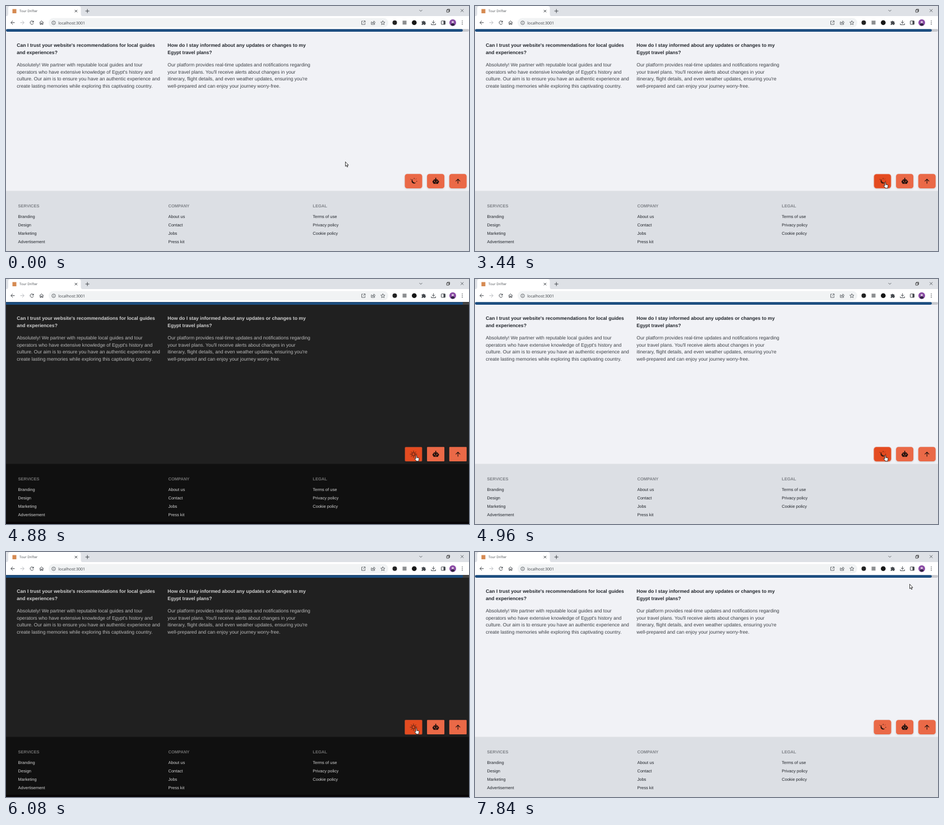
These frames come from a looping animation (826x438 px, 8000 ms). An HTML page:

```html
<!DOCTYPE html>
<html lang="en">
<head>
<meta charset="utf-8">
<title>Tour Drifter</title>
<style>
html, body { margin: 0; width: 100%; height: 100%; overflow: hidden; background: #fff; }
svg {
  display: block; width: 826px; height: 438px;
  animation: theme 8s step-end infinite;
}
text { text-rendering: geometricPrecision; white-space: pre; }

/* browser frame */
.ui { font-family: "Open Sans", "Noto Sans", sans-serif; }
.line { fill: none; stroke: #45494e; stroke-width: 1; }
.thin { stroke-width: .8; }
.dim { stroke: #b9bcc0; }
.solid { fill: #45494e; }

/* page */
.page { font-family: "Liberation Sans", Arial, sans-serif; fill: var(--ink); }
.bg { fill: var(--bg); }
.foot { fill: var(--foot); }
.edge { fill: var(--edge); }
.track { fill: var(--ink); opacity: .2; rx: var(--bar); }
.bar { fill: #1c4e80; rx: var(--bar); }
.head { font-size: 8.61px; font-weight: 700; }
.body { font-size: 8.61px; opacity: .88; }
.title { font-size: 7.53px; font-weight: 700; opacity: .5; }
.link { font-size: 7.53px; }

/* buttons */
.btn { fill: #ea6947; rx: var(--btn); filter: drop-shadow(0 1.5px 1.5px rgba(0, 0, 0, .16)); }
.hot { fill: #e44b20; rx: var(--btn); opacity: 0; }
.ico { fill: #1c100d; }
.ray { fill: none; stroke: #1c100d; stroke-width: .9; stroke-linecap: round; }
.moon { opacity: calc(1 - var(--sun)); }
.sun { opacity: var(--sun); }
#toggle { transform-origin: 727px 313.2px; animation: pop 8s step-end infinite; }
#toggle .hot { animation: hotToggle 8s step-end infinite; }
#bot .hot { animation: hotBot 8s step-end infinite; }

/* pointer */
#pointer { animation: move 8s infinite, shape 8s step-end infinite; }
.arrow { opacity: calc(1 - var(--hand)); }
.hand { opacity: var(--hand); }

/* one percent is 80 ms */
@keyframes theme {
  0%, 62%, 84%, to {
    --bg: #f1f2f6; --foot: #dcdfe4; --edge: #dcdfe4; --ink: #23272d;
    --bar: 2.4px; --btn: 4.3px; --sun: 0;
  }
  44%, 76% {
    --bg: #202020; --foot: #101010; --edge: #080607; --ink: #d0d0d0;
    --bar: .6px; --btn: 1.1px; --sun: 1;
  }
}
@keyframes pop {
  0%, 46%, 65%, 78%, 87%, to { transform: scale(1); }
  41%, 59% { transform: scale(.99); }
  42%, 60%, 62%, 76%, 84% { transform: scale(.98); }
  43%, 61%, 75%, 82% { transform: scale(.965); }
  44% { transform: scale(1.005); }
  45%, 64%, 77%, 86% { transform: scale(1.01); }
  63%, 85% { transform: scale(1.02); }
}
@keyframes hotBot {
  0%, 36%, to { opacity: 0; }
  13% { opacity: .3; }
  14% { opacity: .8; }
  15% { opacity: 1; }
  35% { opacity: .45; }
}
@keyframes hotToggle {
  0%, 88%, to { opacity: 0; }
  36% { opacity: .2; }
  37% { opacity: .7; }
  38% { opacity: 1; }
  87% { opacity: .4; }
}
@keyframes move {
  0% { transform: translate(605px, 278px); animation-timing-function: step-end; }
  3% { transform: translate(605px, 278px); animation-timing-function: steps(3, start); }
  6% { transform: translate(645px, 281px); animation-timing-function: steps(4, start); }
  10% { transform: translate(764px, 288px); animation-timing-function: steps(4, start); }
  14% { transform: translate(778px, 315px); animation-timing-function: step-end; }
  30% { transform: translate(778px, 315px); animation-timing-function: steps(8, start); }
  38% { transform: translate(732px, 315px); animation-timing-function: step-end; }
  86% { transform: translate(732px, 315px); animation-timing-function: steps(3, start); }
  89% { transform: translate(754px, 205px); animation-timing-function: steps(4, start); }
  93% { transform: translate(778px, 64px); animation-timing-function: step-end; }
  98%, to { transform: translate(775px, 57px); animation-timing-function: step-end; }
}
@keyframes shape {
  0%, 34%, 86%, to { --hand: 0; }
  12%, 36% { --hand: 1; }
}
</style>
</head>
<body>
<svg viewBox="0 0 826 438" xmlns="http://www.w3.org/2000/svg">
  <!-- tab strip -->
  <rect width="826" height="19" fill="#dee1e6"/>
  <path d="M0 19Q4 18 4 14V4Q4 0 8 0H129.500Q133.500 0 133.500 4V14Q133.500 18 137.500 19Z" fill="#fff"/>
  <rect x="11.500" y="5.500" width="7" height="7.500" fill="#d58a52"/>
  <text class="ui" x="24" y="11.300" font-size="6" fill="#4a4e53">Tour Drifter</text>
  <path class="line" d="M122.700 6.900l4.400 4.400m0-4.400l-4.400 4.400M141.700 9h7M145.200 5.500v7"/>
  <path class="line thin" d="M737.500 7l2.500 2.500 2.500-2.500M811.200 5.700l5 5m0-5l-5 5"/>
  <path class="line thin" d="M786.200 7h4v4h-4zM787.500 7V5.800h4v4h-1.300" style="stroke:#222"/>

  <!-- toolbar -->
  <rect y="18" width="826" height="23.500" fill="#fff"/>
  <rect x="76" y="21.500" width="606" height="17" rx="8.500" fill="#f1f3f4"/>
  <path class="line" d="M15.500 29.700H8.800m3.200-3.300l-3.300 3.300 3.300 3.300"/>
  <path class="line dim" d="M25.500 29.700h6.700m-3.200-3.300l3.300 3.300-3.300 3.300"/>
  <path class="line" d="M48.700 27.900A3.100 3.100 0 1 0 49.100 30.800"/>
  <path class="solid" d="M49.500 26v3.200h-3.200z"/>
  <path class="line" d="M59.900 29.700l3.500-3.200 3.500 3.200M60.900 29v4h1.700v-2.300h1.600V33h1.700v-4"/>
  <circle class="line thin" cx="85" cy="30" r="3.200"/>
  <path class="line thin" d="M85 29.500v2.100M85 28v.8"/>
  <text class="ui" x="93.300" y="32.600" font-size="7.100" fill="#3b3f44">localhost:3001</text>
  <path class="line thin" d="M637 27h-2.500v6h6v-2.500M638 26.700h2.800v2.800M640.500 27l-3.500 3.500"/>
  <path class="line thin" d="M653 28.500h-1.300V33h6v-1.500M653.300 31q.4-2.500 3-2.500v-1.700l2.500 2.600-2.500 2.300v-1.600q-2 0-3 .9z"/>
  <path class="line thin" d="M672.300 26.300l1 2.500 2.700.2-2 1.800.6 2.600-2.300-1.400-2.300 1.400.6-2.600-2-1.800 2.700-.2z"/>
  <circle cx="693.500" cy="29.800" r="4" fill="#222"/>
  <rect x="707.500" y="26.200" width="7" height="7" fill="#8d8f91"/>
  <circle cx="728.300" cy="29.800" r="4.300" fill="#161616"/>
  <path class="solid" d="M741.600 27.500h2a1.300 1.300 0 0 1 2.500 0h2v2.200a1.300 1.300 0 0 1 0 2.500v1.500h-2.200a1.200 1.200 0 0 0-2.300 0h-2v-2a1.200 1.200 0 0 0 0-2.300z"/>
  <path class="line" d="M762.600 25.700v5m-2.700-2.300l2.700 2.600 2.700-2.600M758.800 31.300v2.200h7.600v-2.200"/>
  <rect class="line" x="776.500" y="26.700" width="7" height="6.200" rx=".6"/>
  <rect class="solid" x="780.500" y="26.700" width="3" height="6.200"/>
  <circle cx="797" cy="29.800" r="6" fill="#8a4ba5"/>
  <path d="M793.700 34.300q0-3.300 3.300-3.300t3.300 3.300q-3.300 2.200-6.600 0z" fill="#2f2440"/>
  <circle cx="797" cy="28.700" r="2" fill="#d9c6dc"/>
  <g class="solid">
    <circle cx="814" cy="26.800" r=".8"/><circle cx="814" cy="29.700" r=".8"/><circle cx="814" cy="32.600" r=".8"/>
  </g>

  <!-- page -->
  <g class="page">
    <rect class="bg" y="41" width="826" height="290"/>
    <rect class="track" y="41.200" width="826" height="4.700"/>
    <rect class="bar" y="41.200" width="815" height="4.700"/>
    <g class="head">
      <text x="19.300" y="73.200">Can I trust your website's recommendations for local guides</text>
      <text x="19.300" y="86.100">and experiences?</text>
      <text x="288.300" y="73.200">How do I stay informed about any updates or changes to my</text>
      <text x="288.300" y="86.100">Egypt travel plans?</text>
    </g>
    <g class="body">
      <text x="19.300" y="107.600">Absolutely! We partner with reputable local guides and tour</text>
      <text x="19.300" y="120.500">operators who have extensive knowledge of Egypt's history and</text>
      <text x="19.300" y="133.400">culture. Our aim is to ensure you have an authentic experience and</text>
      <text x="19.300" y="146.300">create lasting memories while exploring this captivating country.</text>
      <text x="288.300" y="107.600">Our platform provides real-time updates and notifications regarding</text>
      <text x="288.300" y="120.500">your travel plans. You'll receive alerts about changes in your</text>
      <text x="288.300" y="133.400">itinerary, flight details, and even weather updates, ensuring you're</text>
      <text x="288.300" y="146.300">well-prepared and can enjoy your journey worry-free.</text>
    </g>
    <rect class="foot" y="330.500" width="826" height="107.500"/>
    <rect class="edge" y="434" width="826" height="4"/>
    <g class="title">
      <text x="21.600" y="359.700">SERVICES</text>
      <text x="289.500" y="359.700">COMPANY</text>
      <text x="547.300" y="359.700">LEGAL</text>
    </g>
    <g class="link">
      <text x="21.600" y="379.200">Branding</text>
      <text x="21.600" y="394.200">Design</text>
      <text x="21.600" y="409.300">Marketing</text>
      <text x="21.600" y="424.300">Advertisement</text>
      <text x="289.500" y="379.200">About us</text>
      <text x="289.500" y="394.200">Contact</text>
      <text x="289.500" y="409.300">Jobs</text>
      <text x="289.500" y="424.300">Press kit</text>
      <text x="547.300" y="379.200">Terms of use</text>
      <text x="547.300" y="394.200">Privacy policy</text>
      <text x="547.300" y="409.300">Cookie policy</text>
    </g>
  </g>

  <!-- floating buttons -->
  <g id="toggle">
    <rect class="btn" x="711.500" y="300.300" width="31" height="25.800"/>
    <rect class="hot" x="711.500" y="300.300" width="31" height="25.800"/>
    <g class="moon">
      <path class="ico" d="M725.600 309.300a4.400 4.400 0 1 0 6 6.200 4.600 4.600 0 0 1-6-6.200z"/>
      <path class="ray" d="M722 309.500l1 1M728.200 307.900v1M732.300 313.400h.7" stroke-width=".8"/>
      <path class="ray" d="M731 309.700l.8-.8" style="stroke:#8e1f16"/>
    </g>
    <g class="sun">
      <circle class="ray" cx="727" cy="313.200" r="3"/>
      <path class="ray" d="M727 307.300v1.200M727 317.900v1.200M721.100 313.200h1.200M731.700 313.200h1.200M722.800 309l.9.900M730.300 316.500l.9.900M722.800 317.400l.9-.9M730.300 309.900l.9-.9"/>
    </g>
  </g>
  <g id="bot">
    <rect class="btn" x="751.100" y="300.300" width="31" height="25.800"/>
    <rect class="hot" x="751.100" y="300.300" width="31" height="25.800"/>
    <path class="ico" fill-rule="evenodd" d="M766.100 309.900v-.7a1.100 1.100 0 1 1 1.200 0v.7h1.100q2.700 0 2.700 2.700h.5q.8 0 .8.800v1.600q0 .8-.8.800h-.5v1q0 1.300-1.300 1.300h-6.200q-1.300 0-1.300-1.300v-1h-.5q-.8 0-.8-.8v-1.600q0-.8.8-.8h.5q0-2.700 2.700-2.700zM764.600 312.200a1.050 1.050 0 1 0 .01 0zM768.800 312.200a1.050 1.050 0 1 0 .01 0zM764.800 315.700h3.800v.9h-3.800z"/>
  </g>
  <g>
    <rect class="btn" x="790.800" y="300.300" width="31" height="25.800"/>
    <path class="ray" d="M806.300 317.500v-8m-3.900 3.900l3.900-3.900 3.900 3.900" style="stroke-width:1.100;stroke-linecap:butt"/>
  </g>

  <!-- pointer -->
  <g id="pointer" stroke-linejoin="round">
    <path class="arrow" d="M.5.500V8.600L2.300 7l1.300 2.900 1.300-.6L3.600 6.500H6z" fill="#fff" stroke="#111" stroke-width=".8"/>
    <path class="hand" d="M-.9 1.200Q-.9.200 0 .2T.9 1.200V4.200L3.800 4.700Q5 5 5 6.200L4.300 9.400V10.700H-.3V9.600L-3 6.700Q-3.200 5.500-2 5.600L-.9 6.500z" fill="#fff" stroke="#111" stroke-width=".8"/>
  </g>
</svg>
</body>
</html>
```
